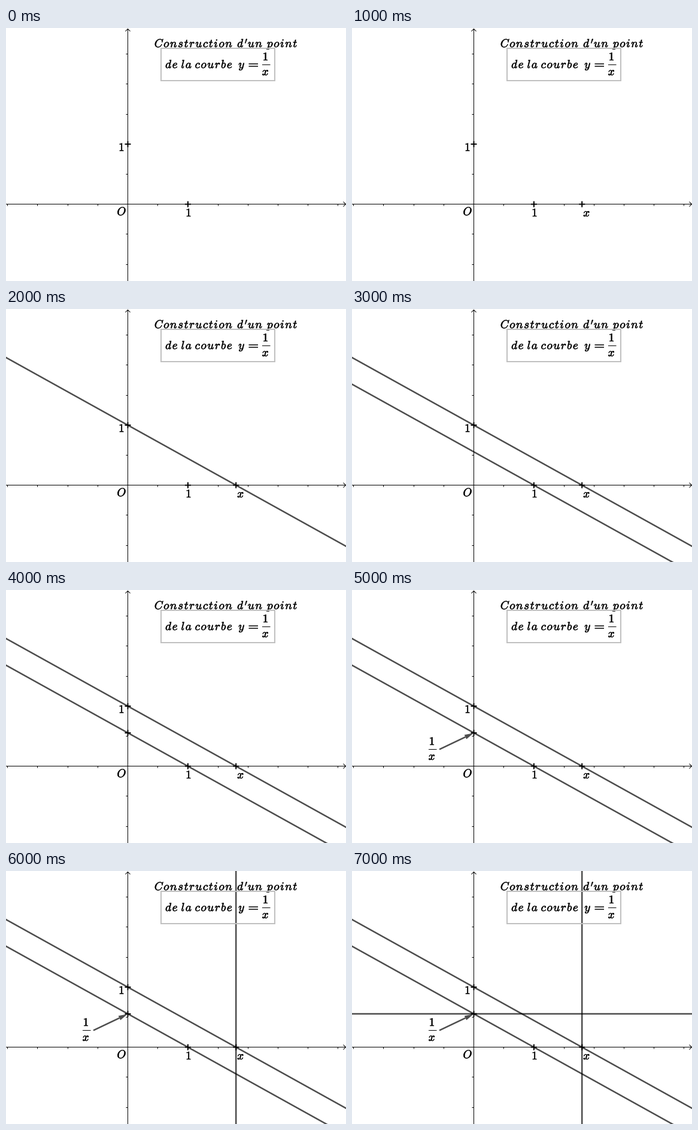
These frames come from a looping animation (568 px wide and 423 px high, 8000 ms). A matplotlib script:

```python
import matplotlib.pyplot as plt
from matplotlib.animation import FuncAnimation
from matplotlib.patches import PathPatch, Polygon, Rectangle
from matplotlib.textpath import TextPath
from matplotlib.transforms import Affine2D

W, H, DPI = 568, 423, 72  # at 72 dpi one point is one pixel
plt.rcParams["mathtext.fontset"] = "cm"

OX, OY, UNIT = 203.5, 294.6, 100.4
X = 1.8
SIZE = 19.2
TRACK = r"\hspace{0.093}"

fig = plt.figure(figsize=(W / DPI, H / DPI), dpi=DPI, facecolor="white")
ax = fig.add_axes([0, 0, 1, 1])
ax.set_xlim(0, W)
ax.set_ylim(H, 0)
ax.axis("off")


def px(x, y):
    """Graph coordinates to stage pixels."""
    return OX + x * UNIT, OY - y * UNIT


def mid(v):
    """Centre of the pixel that holds v."""
    return int(v) + 0.5


def line(p, q, width=1.0, z=2, **style):
    style = {"color": "black", "solid_capstyle": "butt", **style}
    return ax.plot([p[0], q[0]], [p[1], q[1]], lw=width, zorder=z,
                   snap=False, **style)[0]


def math(s, left, base, size=SIZE, weight=0.65, z=5):
    """Math text with its ink starting at left, emboldened by an outline."""
    path = TextPath((0, 0), f"${s}$", size=size)
    shift = left + weight / 2 - path.get_extents().x0
    path = path.transformed(Affine2D().scale(1, -1).translate(shift, base))
    return ax.add_patch(PathPatch(path, fc="black", ec="black", lw=weight,
                                  joinstyle="round", zorder=z))


def word(s, left, base, **kw):
    return math(TRACK.join(s), left, base, **kw)


def one(left, base):
    return math(r"\mathbf{1}", left, base)


def inverse(left, bar):
    """The fraction 1/x."""
    return [one(left + 2, bar - 7.5), word("x", left, bar + 17.5),
            line((left, bar), (left + 13.5, bar), 1.0, z=5)]


def cross(x, y):
    cx, cy = px(x, y)
    return [line((cx - 5, cy), (cx + 5, cy), 2, z=4),
            line((cx, cy - 5), (cx, cy + 5), 2, z=4)]


def stroke(p, q):
    return [line(p, q, 2.5, z=3, alpha=0.7)]


def slanted(x0):
    """Parallel to the line through (0, 1) and (X, 0), crossing the axis at x0."""
    a, b = -W / UNIT, 2 * W / UNIT
    return stroke(px(a, (x0 - a) / X), px(b, (x0 - b) / X))


def arrow(tail, tip, length=15, half=4):
    dx, dy = tip[0] - tail[0], tip[1] - tail[1]
    n = (dx * dx + dy * dy) ** 0.5
    ux, uy = dx / n, dy / n
    bx, by = tip[0] - length * ux, tip[1] - length * uy
    head = [tip, (bx - half * uy, by + half * ux),
            (bx + half * uy, by - half * ux)]
    gray = "#4d4d4d"
    return [line(tail, (bx, by), 2.5, z=3, color=gray),
            ax.add_patch(Polygon(head, fc=gray, ec="none", zorder=3))]


def draw_axes():
    ax_x, ax_y = mid(OX), mid(OY)
    line((0, ax_y), (W, ax_y))
    line((ax_x, 1), (ax_x, H))
    for s in (-1, 1):
        line((W - 4.5, ax_y + 4 * s), (W - 0.5, ax_y))
        line((ax_x + 4 * s, 5.5), (ax_x, 1.5))
    for k in range(-4, 8):
        x = mid(px(k / 2, 0)[0])
        line((x, ax_y), (x, ax_y + 3))
    for k in range(-2, 6):
        y = mid(px(0, k / 2)[1])
        line((ax_x - 3, y), (ax_x, y))


def draw_title():
    word("Construction", 248.5, 32)
    word("d", 386.5, 32)
    math(r"\prime", 399, 26, size=14)
    word("un", 404, 32)
    word("point", 435, 32)
    ax.add_patch(Rectangle((259, 34), 190, 54, fc="none", ec="#c0c0c0",
                           lw=2, zorder=6, snap=False))
    word("de", 266.5, 67)
    word("la", 293, 67)
    word("courbe", 316, 67)
    word("y", 388.5, 67)
    for y in (60, 64):
        line((405.5, y), (421, y), 1.5, z=5)
    inverse(428, 61.5)


draw_axes()
draw_title()
cross(1, 0)
cross(0, 1)
one(301.5, 315)
one(189.5, 205.5)
word("O", 186, 313)

# Each step of the construction appears one second after the previous one.
vx, hy = px(X, 1 / X)
steps = [
    cross(X, 0) + [word("x", 386.5, 315)],
    slanted(X),
    slanted(1),
    cross(0, 1 / X),
    inverse(128, 266.5) + arrow((146, 266.5), (OX - 0.5, hy + 0.5)),
    stroke((vx, 0), (vx, H)),
    stroke((0, hy), (W, hy)),
]


def update(frame):
    for i, step in enumerate(steps):
        for artist in step:
            artist.set_visible(frame > i)
    return [a for step in steps for a in step]


anim = FuncAnimation(fig, update, frames=len(steps) + 1, interval=1000,
                     repeat=True, repeat_delay=0)
plt.show()
```
